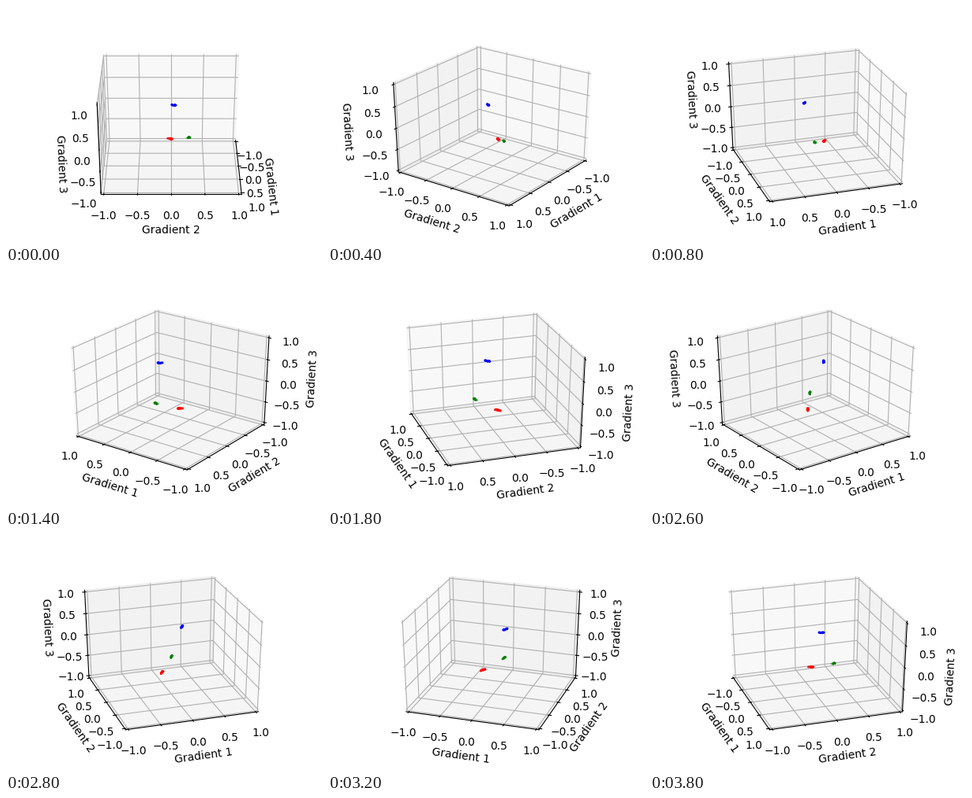
Animation of 400x300 px, one loop 4 s. Source, as a matplotlib script:

```python
import math

import matplotlib.pyplot as plt
import numpy as np
from matplotlib.animation import FuncAnimation

FRAMES = 20
INTERVAL = 200

plt.rcParams["axes3d.automargin"] = True
rng = np.random.default_rng(4)

fig = plt.figure(figsize=(4, 3), dpi=100)
ax = fig.add_subplot(projection="3d")

# Unit cube stretched over the full subplot rectangle.
ax.apply_aspect = lambda position=None: None
ax.set_box_aspect((1, 1, 1), zoom=math.sqrt(3) / 1.8294640721620434)


def cluster(center, spread, color, count=24):
    t = rng.uniform(-1, 1, (count, 1))
    pts = np.array(center) + t * np.array(spread)
    pts += rng.normal(0, 0.005, pts.shape)
    ax.scatter(*pts.T, color=color, s=1)


cluster((-0.157, -0.026, -0.471), (0.025, 0.035, 0.008), "red")
cluster((0.089, 0.266, -0.300), (0.018, 0.014, 0.014), "green")
cluster((0.177, 0.033, 0.507), (0.025, 0.035, 0.008), "blue")

ticks = np.linspace(-1, 1, 5)
ax.set(xlim=(-1, 1), ylim=(-1, 1), zlim=(-1, 1),
       xticks=ticks, yticks=ticks, zticks=ticks,
       xlabel="Gradient 1", ylabel="Gradient 2", zlabel="Gradient 3")


def update(i):
    ax.view_init(elev=30, azim=i * 360 / FRAMES)
    return []


anim = FuncAnimation(fig, update, frames=FRAMES, interval=INTERVAL,
                     repeat=True, repeat_delay=0)
plt.show()
```
